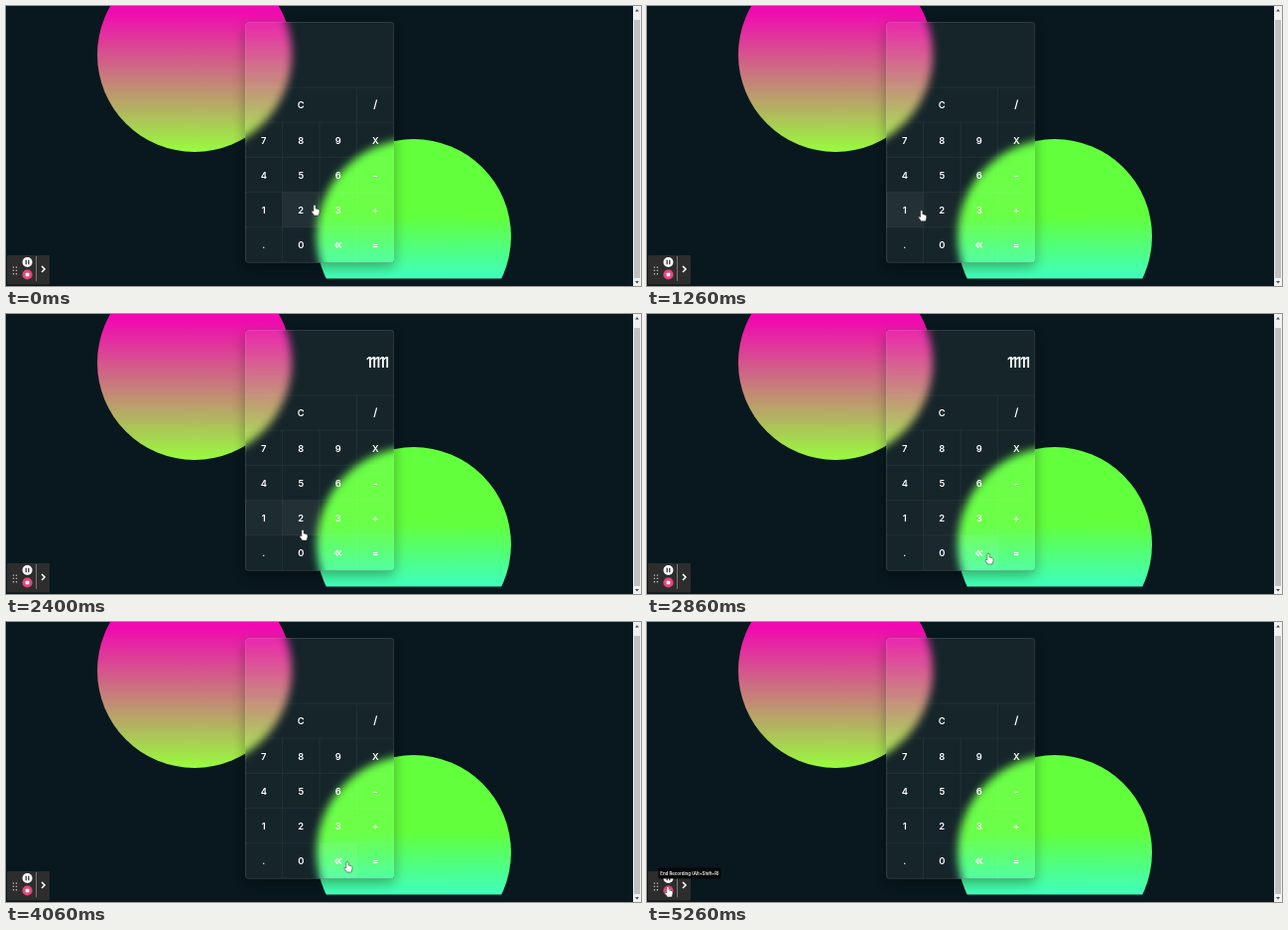
Recreate the animation shown at these times as an HTML page. Size 640 px wide and 282 px high, loop 5.33 s.

```html
<!DOCTYPE html>
<html lang="en">
<head>
<meta charset="utf-8">
<title>Glass calculator</title>
<style>
  html, body { margin: 0; width: 100%; height: 100%; overflow: hidden; background: #08181e; }
  svg { display: block; width: 640px; height: 282px; }
  text { font-family: Inter, "Open Sans", sans-serif; font-weight: 600; fill: #fff; }
  .key { font-size: 9.4px; text-anchor: middle; }
  #display { font-size: 14px; letter-spacing: -1.6px; text-anchor: end; }
  #tip text { font-size: 4.4px; text-anchor: middle; }
</style>
</head>
<body>
<svg viewBox="0 0 640 282">
  <defs>
    <linearGradient id="pink" gradientUnits="userSpaceOnUse" x1="0" y1="6" x2="0" y2="147">
      <stop stop-color="#f00ab0"/><stop offset="1" stop-color="#98fc3e"/>
    </linearGradient>
    <linearGradient id="green" gradientUnits="userSpaceOnUse" x1="0" y1="212" x2="0" y2="274">
      <stop stop-color="#62ff3c"/><stop offset="1" stop-color="#3fffbc"/>
    </linearGradient>
    <filter id="blur" filterUnits="userSpaceOnUse" x="0" y="-80" width="640" height="400" color-interpolation-filters="sRGB">
      <feGaussianBlur stdDeviation="4"/>
    </filter>
    <filter id="soft" x="-30%" y="-30%" width="160%" height="160%"><feGaussianBlur stdDeviation="6.5"/></filter>
    <clipPath id="page"><rect width="632" height="274.5"/></clipPath>
    <clipPath id="glass"><rect x="241" y="16" width="150" height="242.5" rx="3"/></clipPath>
    <g id="orbs" clip-path="url(#page)">
      <circle cx="190" cy="49" r="98" fill="url(#pink)"/>
      <circle cx="411" cy="232" r="98" fill="url(#green)"/>
    </g>
  </defs>

  <rect width="640" height="282" fill="#08181e"/>
  <use href="#orbs"/>
  <rect x="241" y="21" width="150" height="242" fill="#000" opacity=".32" filter="url(#soft)"/>
  <g clip-path="url(#glass)">
    <rect x="241" y="16" width="150" height="243" fill="#08181e"/>
    <use href="#orbs" filter="url(#blur)"/>
    <rect x="241" y="16" width="150" height="243" fill="#fff" opacity=".055"/>
    <g id="keys"></g>
  </g>
  <rect x="241.4" y="16.4" width="149.4" height="242" rx="3" fill="none" stroke="#fff" stroke-opacity=".14" stroke-width=".8"/>
  <text id="display" x="384.6" y="54"></text>

  <g id="scrollbar">
    <rect x="632" width="8" height="282" fill="#f1f1f1"/>
    <rect x="633" y="14" width="6" height="260" fill="#c1c1c1"/>
    <path d="M634 5.5l2-2.5 2 2.5zM634 277l2 2.5 2-2.5z" fill="#505050"/>
  </g>

  <g id="toolbar">
    <rect x="1" y="251" width="43" height="29.5" rx="1" fill="#2d2d2e"/>
    <path d="M7.5 262.5v8M10.5 262.5v8" stroke="#bbb" stroke-width="1.3" stroke-dasharray="1.3 2"/>
    <circle cx="21.5" cy="258" r="5" fill="#fff"/>
    <path d="M20.2 255.8v4.4M22.8 255.8v4.4" stroke="#222" stroke-width="1.2"/>
    <circle cx="21.5" cy="270.5" r="5.1" fill="#e0487a"/>
    <rect x="19.7" y="268.7" width="3.6" height="3.6" rx=".6" fill="#fff"/>
    <path d="M30.5 252v25" stroke="#777"/>
    <path d="M36 262l3 3-3 3" fill="none" stroke="#fff" stroke-width="1.5"/>
  </g>
  <g id="tip">
    <rect x="11.5" y="247.5" width="63" height="11" rx="1" fill="#060808"/>
    <text x="43" y="254.6">End Recording (Alt+Shift+R)</text>
  </g>

  <circle id="ring" r="14.5" fill="none" stroke="#a30c2c" stroke-width="1.3"/>
  <g id="cursor" fill="#fff" stroke="#222" stroke-width=".5" stroke-linejoin="round">
    <path id="hand" d="M-1.1 .9Q0-.6 1.1 .9V4L4 4.7Q5.3 5.1 5 7.5L4 11H-.5L-3 7.3Q-3.4 5.6-1.1 6.7Z"/>
    <path id="arrow" d="M0 0V9L2 7.2 3.4 10.2 4.8 9.6 3.5 6.7H6.3Z"/>
  </g>
</svg>

<script>
const LOOP = 5330, FRAME = LOOP / 80, FADE = 500, PRESS = 80;
const $ = id => document.getElementById(id);

// time, x, y of the pointer tip
const path = [
  [0, 311, 200], [330, 292, 213], [600, 292, 213], [730, 289, 212], [1050, 277, 206],
  [1450, 276.5, 205.5], [2200, 276.5, 205.5], [2400, 299, 217], [2860, 344, 241],
  [4330, 344, 241], [4930, 26, 263], [5200, 21, 266], [LOOP, 21, 266]
];
const typed = [1550, 1700, 1850, 2000, 2150];
const erased = [3240, 3410, 3600, 3770, 3940];

const keys = [];
function addKey(label, col, row, span = 1) {
  const x = 241 + col * 37.5, y = 82 + row * 35.2, w = span * 37.5;
  const cx = x + w / 2, cy = y + 18;
  const face = label === "«"
    ? `<path d="M${cx - .2} ${cy - 2.8}l-3 2.8 3 2.8m3.4-5.6l-3 2.8 3 2.8" fill="none" stroke="#fff" stroke-width="1.3"/>`
    : `<text class="key" x="${cx}" y="${cy + 3.4}"${label === "/" ? ' style="font-size:11px"' : ""}>${label}</text>`;
  $("keys").insertAdjacentHTML("beforeend", `<g>
    <rect x="${x}" y="${y}" width="${w}" height="35.2"/>
    <path d="M${x} ${y + 35.2}V${y}H${x + w}" fill="none" stroke="#fff" stroke-opacity=".05"/>${face}</g>`);
  const group = $("keys").lastChild;
  keys.push({ label, x, y, w, rect: group.querySelector("rect"), face: group.lastChild });
}
addKey("C", 0, 0, 3);
addKey("/", 3, 0);
["789X", "456-", "123+", ".0«="].forEach((line, row) =>
  [...line].forEach((label, col) => addKey(label, col, row + 1)));

function pointer(t) {
  const i = Math.max(1, path.findIndex(p => p[0] >= t));
  const [t0, x0, y0] = path[i - 1], [t1, x1, y1] = path[i];
  const u = Math.max(0, (t - t0) / (t1 - t0)), e = u * u * (3 - 2 * u);
  return [x0 + (x1 - x0) * e, y0 + (y1 - y0) * e];
}

function isOver(key, t) {
  const [x, y] = pointer(t);
  return x >= key.x && x < key.x + key.w && y >= key.y && y < key.y + 35.2;
}

// Hover lights at once and fades after the pointer leaves.
function glow(key, t) {
  for (let age = 0; age < FADE && age <= t; age += 20)
    if (isOver(key, t - age)) return (1 - age / FADE) ** 1.3;
  return 0;
}

const show = (id, on) => $(id).setAttribute("visibility", on ? "visible" : "hidden");

function draw(t) {
  const [x, y] = pointer(t);
  const pressed = [...typed, ...erased].some(up => t >= up - PRESS && t < up);
  let overKey = false;
  for (const key of keys) {
    const over = isOver(key, t), active = over && pressed;
    overKey ||= over;
    key.rect.setAttribute("fill", active ? "#c6005e" : "#fff");
    key.rect.setAttribute("fill-opacity", active ? 1 : .055 * glow(key, t));
    key.face.style[key.label === "«" ? "stroke" : "fill"] = active ? "#650b30" : "#fff";
  }
  const count = list => list.filter(up => up <= t).length;
  $("display").textContent = "1".repeat(count(typed) - count(erased));

  const hand = overKey || (x < 29 && y > 252);
  show("hand", hand);
  show("arrow", !hand);
  show("ring", pressed);
  show("tip", t > 5120);
  for (const id of ["ring", "cursor"]) $(id).setAttribute("transform", `translate(${x} ${y})`);
}

const start = performance.now();
function tick() {
  const t = (performance.now() - start) % LOOP;
  draw(Math.min(79, Math.floor((t + 7) / FRAME)) * FRAME);
  requestAnimationFrame(tick);
}
tick();
</script>
</body>
</html>
```
